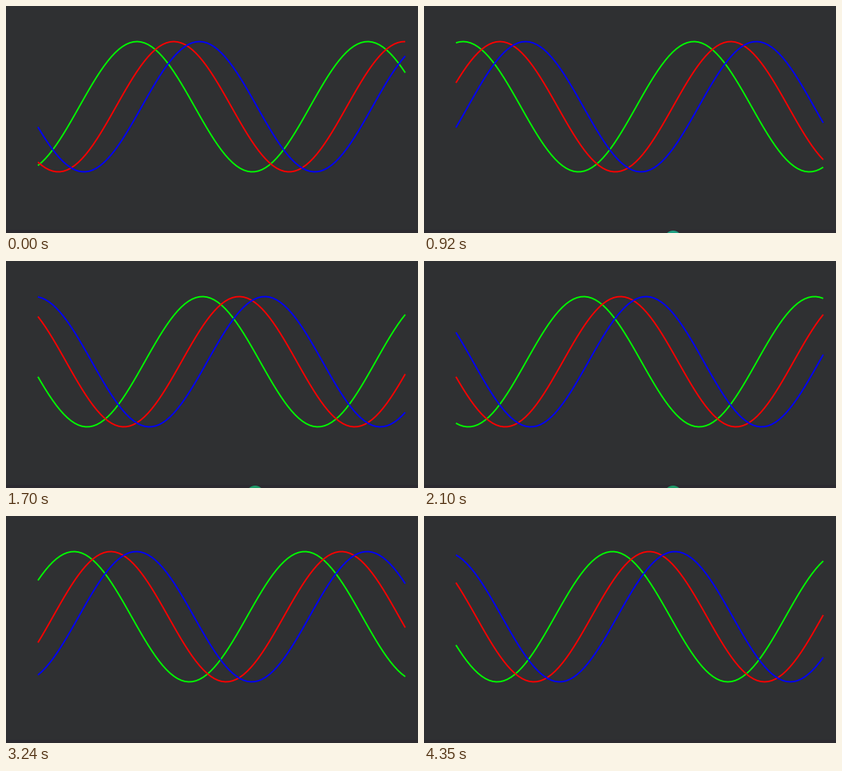
Write a matplotlib script that moves like this. It is 516 px wide and 284 px high and loops after 4.42 s.

```python
import numpy as np
import matplotlib.pyplot as plt
from matplotlib.animation import FuncAnimation
from matplotlib.patches import Circle, Rectangle

W, H = 516, 284
DPI = 128
LOOP_MS = 4420
TICK_MS = 10

LEFT = 40            # x of the first sample
RAD_PX = 46          # pixels per radian
MID_Y, AMP = 126, 81.5
START_PHASE = -1.125
PHASE_STEP = 0.5

# The curves jump half a radian to the left at each of these times.
MOVES = [70, 300, 460, 690, 920, 1090, 1320, 1470, 1700, 1930, 2100,
         2330, 2480, 2710, 2880, 3110, 3340, 3490, 3720, 3950, 4120, 4350]

# (colour, lag behind the first curve in radians)
WAVES = [("#00ff00", 0.0), ("#ff0000", 1.0), ("#0000ff", 1.7)]

# (from ms, to ms, colour) while the dot peeks over the bottom edge
BLINKS = [(380, 1000, "#1f9f83"), (1320, 2160, "#1f9a68"),
          (2480, 2960, "#1f9a48"), (3260, 3950, "#1f9f7d")]

fig = plt.figure(figsize=(W / DPI, H / DPI), dpi=DPI, facecolor="#2f3032")
ax = fig.add_axes([0, 0, 1, 1])
ax.set_xlim(0, W)
ax.set_ylim(H, 0)
ax.axis("off")

ax.add_patch(Rectangle((0, 280), W, 4, color="#2c2a30", lw=0))
dot = ax.add_patch(Circle((312, 292), 11, lw=0, visible=False))

angle = np.linspace(0, 10, 101)
xs = LEFT + RAD_PX * angle
lines = [ax.plot(xs, xs, color=color, lw=1.8 * 72 / DPI,
                 solid_capstyle="butt", solid_joinstyle="round")[0]
         for color, _ in WAVES]


def draw(frame):
    ms = frame * TICK_MS
    moves = sum(ms >= t for t in MOVES)
    phase = START_PHASE + PHASE_STEP * moves
    for line, (_, lag) in zip(lines, WAVES):
        line.set_ydata(MID_Y - AMP * np.sin(angle + phase - lag))

    color = next((c for a, b, c in BLINKS if a <= ms < b), None)
    dot.set_visible(color is not None)
    if color:
        dot.set_facecolor(color)
    return [*lines, dot]


anim = FuncAnimation(fig, draw, frames=LOOP_MS // TICK_MS, interval=TICK_MS,
                     init_func=lambda: draw(0), repeat=True, repeat_delay=0)
plt.show()
```
